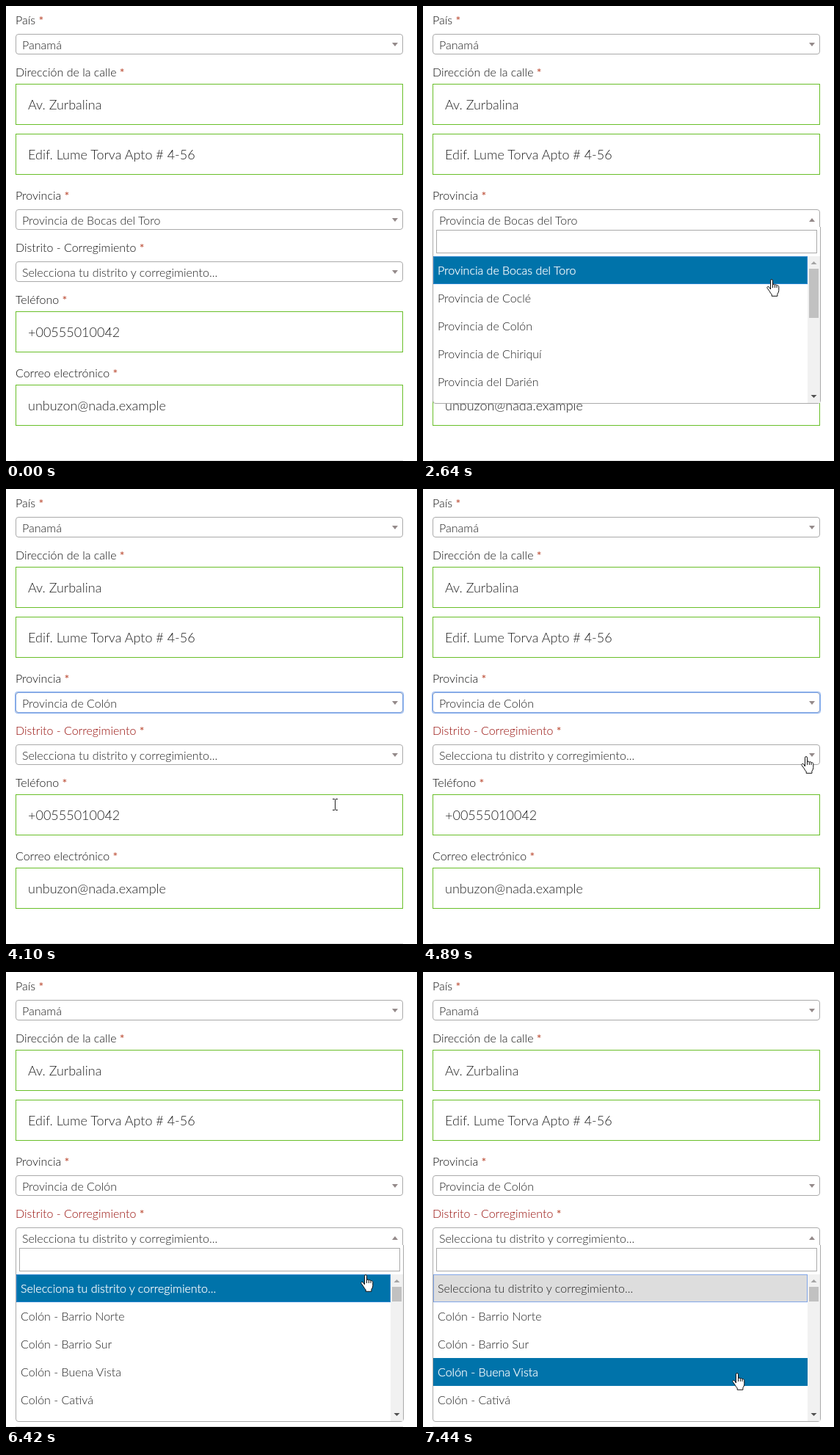
An HTML page that plays this animation: 560x620 px, repeating every 8000 ms.

```html
<!DOCTYPE html>
<html lang="es">
<head>
<meta charset="utf-8">
<title>Formulario</title>
<style>
html, body { margin: 0; width: 100%; height: 100%; overflow: hidden; background: #fff; }
svg { display: block; width: 560px; height: 620px; }
text { font: 300 16px Lato, "Open Sans", sans-serif; fill: #111; white-space: pre; }
.input { font-size: 18px; fill: #222; }
.req { fill: #b8432a; font-weight: 400; }
.invalid { fill: #960c08; }
.item { fill: #222; }
.lit { fill: #fff; stroke: #fff; stroke-width: .25px; }
</style>
</head>
<body>
<svg id="stage" viewBox="0 0 560 620" xmlns="http://www.w3.org/2000/svg"></svg>
<script>
const LOOP = 8000;
const ROW = 38;
const BLUE = "#0073aa";
const stage = document.getElementById("stage");

function add(parent, tag, attrs, content) {
  const el = document.createElementNS("http://www.w3.org/2000/svg", tag);
  for (const name in attrs) el.setAttribute(name, attrs[name]);
  if (content) el.textContent = content;
  parent.appendChild(el);
  return el;
}
const show = (el, on) => el.setAttribute("visibility", on ? "visible" : "hidden");
const place = (el, x, y) => el.setAttribute("transform", `translate(${x} ${y})`);

// One-pixel outlined box with whole-pixel outer edges
const box = (parent, x, y, w, h, stroke, rx = 0, fill = "#fff") =>
  add(parent, "rect", { x: x + .5, y: y + .5, width: w - 1, height: h - 1, rx, fill, stroke });

function label(y, words) {
  const el = add(stage, "text", { x: 13, y }, words + " ");
  add(el, "tspan", { class: "req" }, "*");
  return el;
}

function input(y, words) {
  box(stage, 13, y, 528, 56, "#69bf29");
  add(stage, "text", { x: 30, y: y + 35, class: "input" }, words);
}

function select(y, words) {
  box(stage, 13, y, 528, 28, "#aaa", 3.5);
  const value = add(stage, "text", { x: 22, y: y + 21, class: "item" }, words);
  const arrow = add(stage, "path", { fill: "#948a8a" });
  const point = open => arrow.setAttribute("d", open
    ? `M526 ${y + 17}h8l-4 -5z` : `M526 ${y + 12}h8l-4 5z`);
  point(false);
  return { y, value, point };
}

function dropdown(y, items, thumbY, thumbH) {
  const g = add(stage, "g", {});
  const list = y + 40, end = y + 241;
  add(g, "path", { fill: "#fff", d: `M14 ${y}H541V${end - 1}H14z` });
  add(g, "path", { fill: "none", stroke: "#aaa",
    d: `M13.5 ${y}V${end - 4}q0 3.5 3.5 3.5H538q3.5 0 3.5 -3.5V${y}` });
  box(g, 18, y + 4, 519, 32, "#aaa");
  const rows = items.map((words, i) => ({
    back: add(g, "rect", { x: 14, y: list + i * ROW, width: 510, height: ROW }),
    ring: box(g, 14, list + i * ROW, 510, ROW, "#82a6e8", 0, "none"),
    text: add(g, "text", { x: 20, y: list + i * ROW + 25 }, words)
  }));
  add(g, "rect", { x: 524, y: list, width: 17, height: 200, fill: "#f1f1f1" });
  add(g, "rect", { x: 526, y: list + thumbY, width: 13, height: thumbH, fill: "#c1c1c1" });
  add(g, "path", { fill: "#a3a3a3", d: `M528.5 ${list + 11}h8l-4 -4z` });
  add(g, "path", { fill: "#505050", d: `M528.5 ${end - 12}h8l-4 4z` });

  return {
    search: y + 4,
    list,
    render(open, active, chosen) {
      show(g, open);
      rows.forEach((row, i) => {
        const lit = i === active, picked = i === chosen;
        row.back.setAttribute("fill", lit ? BLUE : picked ? "#ddd" : "#fff");
        row.ring.setAttribute("stroke", lit ? "#2b87d0" : "#82a6e8");
        row.ring.setAttribute("stroke-opacity", picked ? 1 : 0);
        row.text.setAttribute("class", lit ? "lit" : "item");
      });
    }
  };
}

// Form
add(stage, "rect", { width: 560, height: 620, fill: "#fff" });
label(25, "País");
select(38, "Panamá");
label(96, "Dirección de la calle");
input(106, "Av. Zurbalina");
input(174, "Edif. Lume Torva Apto # 4-56");
label(264, "Provincia");
const province = select(277, "Provincia de Bocas del Toro");
const focus = add(stage, "g", {});
box(focus, 12, 276, 530, 30, "#86aeee", 3, "none");
box(focus, 13, 277, 528, 28, "#86a8e2", 3, "none");
const districtLabel = label(335, "Distrito - Corregimiento");
const district = select(348, "Selecciona tu distrito y corregimiento...");
label(406, "Teléfono");
input(416, "+00555010042");
label(506, "Correo electrónico");
input(516, "unbuzon@nada.example");
add(stage, "rect", { x: 13, y: 619, width: 528, height: 1, fill: "#ddd" });

const provinceList = dropdown(301, ["Provincia de Bocas del Toro", "Provincia de Coclé",
  "Provincia de Colón", "Provincia de Chiriquí", "Provincia del Darién"], 17, 67);
const districtList = dropdown(372, ["Selecciona tu distrito y corregimiento...",
  "Colón - Barrio Norte", "Colón - Barrio Sur", "Colón - Buena Vista", "Colón - Cativá"], 17, 20);

// Pointer, each shape with its hot spot at the origin
const click = add(stage, "circle", { r: 12.5, fill: "#f8f000", "fill-opacity": .6 });
const shapes = {
  hand: add(stage, "path", { fill: "#fff", stroke: "#111", "stroke-linejoin": "round",
    d: "M-1.5 14V2.2Q-1.5 .6 0 .6T1.5 2.2V8Q1.7 6.8 3 7T4.3 8.5Q4.7 7.4 5.9 7.7T7 9.3" +
       "Q7.4 8.4 8.5 8.8T9.8 10.5V15.5Q9.8 18 7.9 20.5V23.3H.2V21Q-1.5 19.5 -3 16.5" +
       "L-5.8 12.6Q-6.7 11 -5.4 10.5T-3 11.5L-1.5 14M1.5 8V12M4.3 8.5V12M7 9.3V12" }),
  beam: add(stage, "path", { fill: "none", stroke: "#222",
    d: "M-3 -7.5H0M1 -7.5H4M.5 -7V7M-3 7.5H0M1 7.5H4" }),
  arrow: add(stage, "path", { fill: "#fff", stroke: "#111", "stroke-linejoin": "round",
    d: "M.5 .5V16.5L4.2 13L6.7 18.8L9 17.8L6.5 12.2H11.7z" })
};

// start, end, steps, x, y, ease out
const moves = [
  [1080, 1550, 7, 498, 289, 1],
  [2180, 2640, 7, 475, 372],
  [2710, 2940, 4, 458, 407],
  [3010, 3240, 4, 448, 430, 1],
  [4180, 4730, 8, 522, 363, 1],
  [4890, 4890, 1, 522, 364],
  [6120, 6810, 10, 441, 485],
  [6880, 6880, 1, 438, 493],
  [6980, 7440, 7, 428, 546, 1]
];

function pointerAt(t) {
  let x = 531, y = 273;
  for (const [start, end, steps, toX, toY, ease] of moves) {
    if (t < start) break;
    const pace = steps > 1 ? (end - start) / (steps - 1) : 1;
    const step = Math.min(steps, Math.floor((t - start) / pace + 1e-6) + 1);
    let p = step / steps;
    if (ease) p = Math.sin(p * Math.PI / 2);
    x += (toX - x) * p;
    y += (toY - y) * p;
  }
  return { x: Math.round(x), y: Math.round(y) };
}

const within = (v, from, size) => v >= from && v < from + size;

function shapeAt(y, list) {
  if (list) return within(y, list.search, 32) ? "beam" : "hand";
  if (within(y, 277, 28) || within(y, 348, 28)) return "hand";
  return within(y, 416, 56) ? "beam" : "arrow";
}

function render(t) {
  const { x, y } = pointerAt(t);
  const firstOpen = t >= 1720 && t < 4100;
  const secondOpen = t >= 5500;
  const changed = t >= 4100;
  const list = firstOpen ? provinceList : secondOpen ? districtList : null;
  const active = list ? Math.max(0, Math.floor((y - list.list) / ROW)) : 0;

  province.value.textContent = changed ? "Provincia de Colón" : "Provincia de Bocas del Toro";
  province.point(firstOpen);
  district.point(secondOpen);
  districtLabel.setAttribute("class", changed ? "invalid" : "");
  show(focus, changed && !secondOpen);
  provinceList.render(firstOpen, active, t >= 3930 ? 2 : 0);
  districtList.render(secondOpen, active, 0);

  const pressed = within(t, 1720, 130) || within(t, 3930, 170) || within(t, 5500, 90);
  show(click, pressed);
  place(click, x - 1.5, y);
  const current = t < 1080 ? "" : shapeAt(y, list);
  for (const name in shapes) {
    show(shapes[name], name === current);
    place(shapes[name], x, y);
  }
}

const begin = performance.now();
function tick() {
  render((performance.now() - begin) % LOOP);
  requestAnimationFrame(tick);
}
render(0);
requestAnimationFrame(tick);
</script>
</body>
</html>
```
